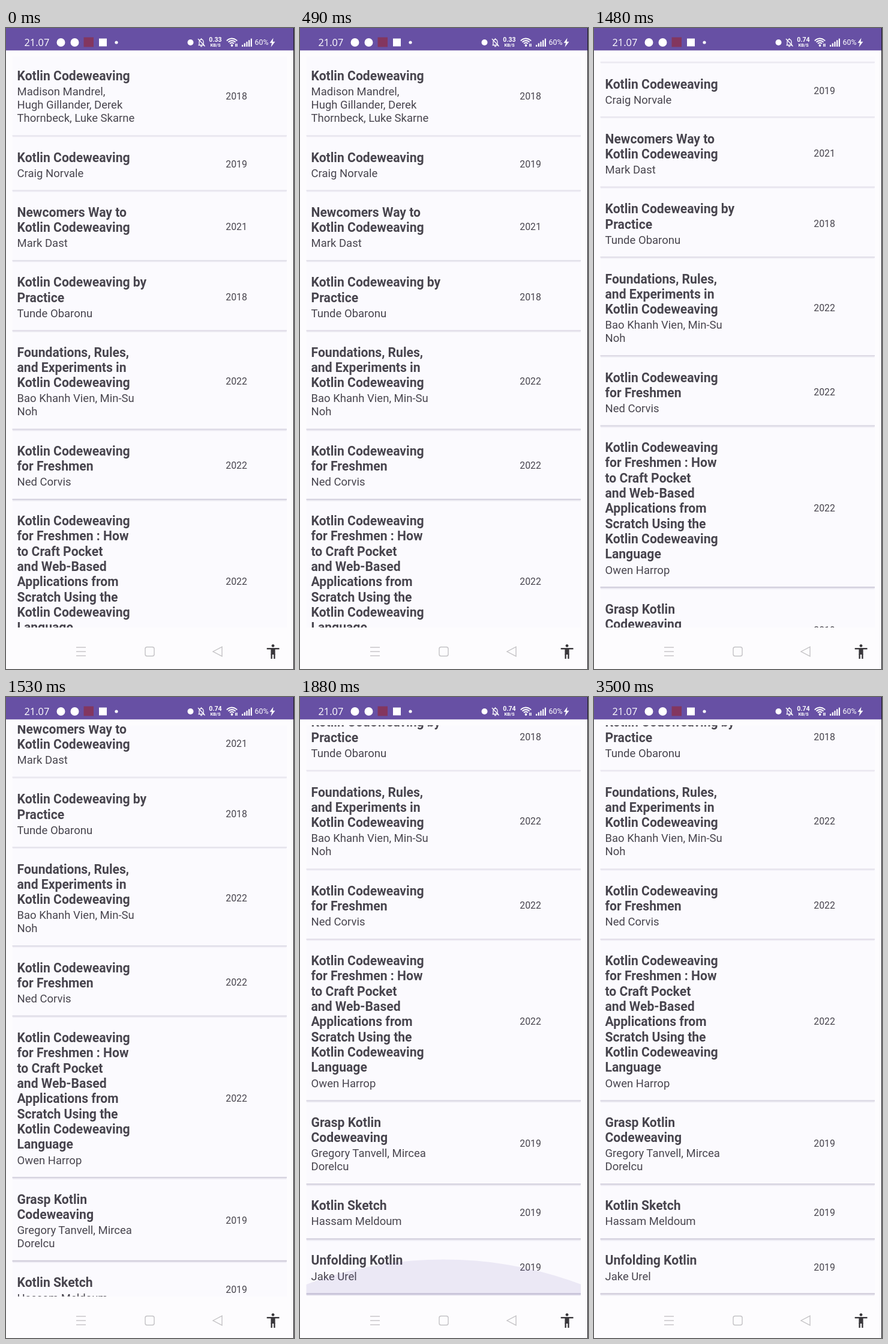
Animation of 480 by 1066 pixels, one loop 3.53 s. Source, as an HTML page with a canvas:

```html
<!DOCTYPE html>
<html lang="en">
<head>
<meta charset="utf-8">
<title>Book list</title>
<style>
  html, body { margin: 0; width: 100%; height: 100%; overflow: hidden; background: #fdfcfe; }
  body { position: relative; font-family: Roboto, sans-serif; color: #48454e; }
  canvas { position: absolute; left: 0; top: 0; width: 480px; height: 1066px; }
  #list { position: absolute; left: 0; top: 47px; width: 479px; height: 950px; overflow: hidden; }
  #rows { position: absolute; left: 0; top: -47px; width: 100%; }
  .row { position: absolute; left: 0; width: 100%; white-space: pre; }
  .row::before { content: ""; position: absolute; left: 11px; width: 457px; height: 100%; background: #fbfafe; }
  .row b, .row span, .row i { position: absolute; left: 18.5px; font-style: normal; }
  .row b { font-size: 21.15px; line-height: 25.333px; }
  .row span { font-size: 18.5px; line-height: 22.1px; }
  .row i { left: 366.3px; font-size: 15.85px; line-height: 22px; }
  .bar { position: absolute; color: #fff; white-space: pre; line-height: 20px; }
  #clock { left: 30.5px; top: 14px; font: 16.4px/20px "Open Sans", sans-serif; }
  #speed, #unit { left: 334px; width: 30px; text-align: center; font-weight: 700; }
  #speed { top: 10px; font-size: 10.6px; }
  #unit { top: 19px; font-size: 7.6px; }
  #charge { left: 414.5px; top: 14px; font-size: 12.4px; }
</style>
</head>
<body>
<div id="list"><div id="rows"></div></div>
<canvas id="stage" width="480" height="1066"></canvas>
<div class="bar" id="clock">21.07</div>
<div class="bar" id="speed">0.33</div>
<div class="bar" id="unit">KB/S</div>
<div class="bar" id="charge">60%</div>
<script>
const LOOP = 3530;
const books = [
  ["Kotlin Codeweaving", "Madison Mandrel,\nHugh Gillander, Derek\nThornbeck, Luke Skarne", 2018],
  ["Kotlin Codeweaving", "Craig Norvale", 2019],
  ["Newcomers Way to\nKotlin Codeweaving", "Mark Dast", 2021],
  ["Kotlin Codeweaving by\nPractice", "Tunde Obaronu", 2018],
  ["Foundations, Rules,\nand Experiments in\nKotlin Codeweaving", "Bao Khanh Vien, Min-Su\nNoh", 2022],
  ["Kotlin Codeweaving\nfor Freshmen", "Ned Corvis", 2022],
  ["Kotlin Codeweaving\nfor Freshmen : How\nto Craft Pocket\nand Web-Based\nApplications from\nScratch Using the\nKotlin Codeweaving\nLanguage", "Owen Harrop", 2022],
  ["Grasp Kotlin\nCodeweaving", "Gregory Tanvell, Mircea\nDorelcu", 2019],
  ["Kotlin Sketch", "Hassam Meldoum", 2019],
  ["Unfolding Kotlin", "Jake Urel", 2019]
];

const $ = id => document.getElementById(id);
const ctx = $("stage").getContext("2d");
const rows = $("rows");
const dividers = [];

function addText(row, tag, text, top) {
  const el = document.createElement(tag);
  el.textContent = text;
  el.style.top = top + "px";
  row.append(el);
}

let y = 43.7;
for (const [title, author, year] of books) {
  const titleH = title.split("\n").length * 25.333;
  const authorH = author.split("\n").length * 22.222;
  const height = 43.585 + titleH + authorH;
  const row = document.createElement("div");
  row.className = "row";
  row.style.top = y + "px";
  row.style.height = height + "px";
  addText(row, "b", title, 23.3);
  addText(row, "span", author, 26 + titleH);
  addText(row, "i", year, height / 2 - 8.5);
  rows.append(row);
  y += height;
  dividers.push(y);
}

const clamp = v => Math.min(1, Math.max(0, v));
const progress = (t, from, to) => clamp((t - from) / (to - from));

function disc(x, y, r, color = "#fff") {
  ctx.fillStyle = color;
  ctx.beginPath();
  ctx.arc(x, y, r, 0, 7);
  ctx.fill();
}

function box(x, y, w, h, color = "#fff") {
  ctx.fillStyle = color;
  ctx.fillRect(x, y, w, h);
}

function line(points, color, width, close) {
  ctx.beginPath();
  points.forEach(([x, y]) => ctx.lineTo(x, y));
  if (close) ctx.closePath();
  ctx.strokeStyle = color;
  ctx.lineWidth = width;
  ctx.stroke();
}

function drawStatus() {
  box(0, 0, 480, 37.3, "#6750a4");
  disc(91.5, 24, 7);
  disc(114.5, 24, 7);
  box(129.5, 15.5, 16.5, 16, "#83365f");
  box(155, 17.5, 13, 13);
  disc(184, 24, 2.6);
  disc(307.5, 24, 5);

  // muted bell
  const bell = new Path2D("M320.5 28.5h10M322 28v-5a3.5 4 0 0 1 7 0v5M324 30.5h3M325.5 17v2");
  ctx.strokeStyle = "#fff";
  ctx.lineWidth = 1.3;
  ctx.stroke(bell);
  line([[320, 18], [331.5, 30.5]], "#fff", 1.3);

  // wireless
  for (const r of [4.5, 8, 11.5]) {
    ctx.beginPath();
    ctx.arc(376.5, 29, r, -Math.PI * 0.77, -Math.PI * 0.23);
    ctx.lineWidth = 1.9;
    ctx.stroke();
  }
  disc(376.5, 29, 1.9);
  box(382, 26, 1.4, 5);
  box(384.3, 26, 1.4, 5);

  for (let i = 0; i < 5; i++) box(393 + i * 3.7, 28 - i * 2.6, 2.2, 3 + i * 2.6);

  ctx.fill(new Path2D("M445.5 16.5l-6 8.2h3.6l-1.6 7 7-9h-4z"));
}

function drawNav() {
  const c = "#c3c2c5";
  for (const ny of [1030, 1037, 1044]) line([[117, ny], [133, ny]], c, 1.4);
  ctx.beginPath();
  ctx.roundRect(232, 1029.5, 15, 15, 3);
  ctx.stroke();
  line([[345, 1037], [360, 1029.2], [360, 1044.8]], c, 1.4, true);

  const dark = "#3a383c";
  disc(445, 1027.3, 2.4, dark);
  box(434.7, 1031, 20.8, 2.4, dark);
  box(441.4, 1031, 7.2, 11, dark);
  box(441.4, 1041, 2.4, 8, dark);
  box(446.2, 1041, 2.4, 8, dark);
}

function drawDividers(scroll) {
  ctx.save();
  ctx.beginPath();
  ctx.rect(0, 47, 479, 950);
  ctx.clip();
  for (const d of dividers) {
    const dy = d - scroll;
    if (dy < 44 || dy > 1000) continue;
    // card shadows deepen toward the bottom of the screen
    const k = dy / 1000;
    const mix = (a, b) => Math.round(a + (b - a) * k);
    const color = `rgb(${mix(236, 208)},${mix(234, 205)},${mix(242, 219)})`;
    box(10.5, dy - 1, 457.5, 1.6 + k * 0.8, color);
    box(11, dy + 0.6 + k * 0.8, 456.5, 1 + k, "rgba(205,201,218,.3)");
  }
  ctx.restore();
}

// end-of-list glow: a flattened circle rising from the lower edge
function drawGlow(t) {
  const fade = 1 - progress(t, 1840, 2290);
  const rise = 1 - (1 - progress(t, 1565, 1830)) ** 2.7;
  const s = rise * fade * fade;
  if (s <= 0) return;
  ctx.save();
  ctx.beginPath();
  ctx.rect(10.5, 900, 457.5, 95);
  ctx.clip();
  ctx.fillStyle = `rgba(103,80,164,${0.11 * fade})`;
  ctx.beginPath();
  ctx.ellipse(239.5, 996 + 475 * s, 548, 548 * s, 0, 0, 7);
  ctx.fill();
  ctx.restore();
}

function draw(now) {
  const t = now % LOOP;
  const scroll = 381 * progress(t, 1330, 1565) ** 2.53;
  rows.style.transform = `translateY(${-scroll}px)`;
  $("speed").textContent = t < 1330 ? "0.33" : "0.74";
  ctx.clearRect(0, 0, 480, 1066);
  drawDividers(scroll);
  drawGlow(t);
  drawStatus();
  drawNav();
  box(479, 0, 1, 1066, "#1c1a20");
}

let start;
function tick(now) {
  start ??= now;
  draw(now - start);
  requestAnimationFrame(tick);
}
draw(0);
requestAnimationFrame(tick);
</script>
</body>
</html>
```
